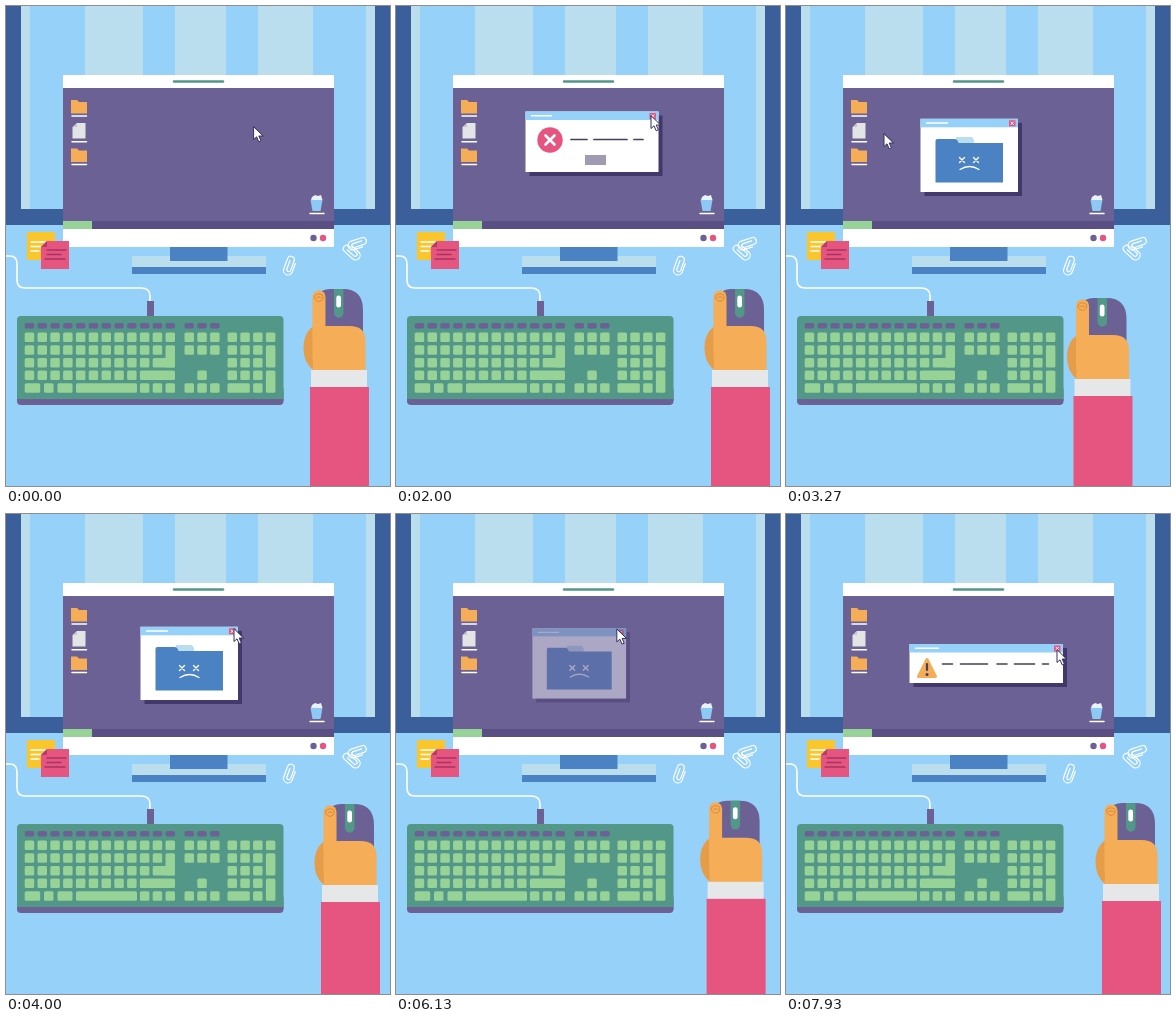
Write an HTML page that moves like this. It is 384 by 480 pixels and loops after 8000 ms.

```html
<!DOCTYPE html>
<html lang="en">
<head>
<meta charset="utf-8">
<title>Desktop errors</title>
<style>
html, body { margin: 0; width: 100%; height: 100%; overflow: hidden; background: #95d1f9; }
svg { display: block; width: 384px; height: 480px; }
</style>
</head>
<body>
<svg id="stage" viewBox="0 0 384 480" fill="none" stroke-linecap="round" stroke-linejoin="round"></svg>
<script>
const C = {
  sky: '#95d1f9', pale: '#bbdeef', navy: '#3b5f9b', blue: '#4a82c4', purple: '#6b6195',
  dark: '#594f84', shade: '#43386c', teal: '#539789', green: '#97d296', orange: '#f5ad57',
  tan: '#e69d4a', pink: '#e6557f', grey: '#e5e7e9', ink: '#43405f', white: '#fff'
};
const stage = document.getElementById('stage');

// Shape helpers; rect takes left, top, right, bottom
const rect = (x, y, x2, y2, fill, r = 0) =>
  `<rect x="${x}" y="${y}" width="${x2 - x}" height="${y2 - y}" rx="${r}" fill="${fill}"/>`;
const shape = (d, fill) => `<path d="${d}" fill="${fill}"/>`;
const line = (d, color = C.white, w = 1.5) => `<path d="${d}" stroke="${color}" stroke-width="${w}"/>`;
const dot = (x, y, r, fill) => `<circle cx="${x}" cy="${y}" r="${r}" fill="${fill}"/>`;
const group = (id, body) => `<g id="${id}">${body}</g>`;

function room() {
  const bars = [[15, 24], [79, 137], [169, 220], [252, 307], [360, 369]];
  return rect(0, 0, 384, 480, C.sky) + rect(0, 0, 384, 219, C.navy) + rect(15, 0, 369, 203, C.sky) +
    bars.map(([a, b]) => rect(a, 0, b, 203, C.pale)).join('');
}

function folder(y) {
  return shape(`M65 ${y}h6l2 2h8v11.500h-16z`, C.orange) + line(`M66 ${y + 16}h14.500`);
}

function monitor() {
  return rect(126, 250, 260, 261, C.pale) + rect(126, 261, 260, 268, C.blue) + rect(164, 240, 221.500, 255, C.blue) +
    rect(57, 69, 328, 241, C.white) + rect(57, 82, 328, 223, C.purple) +
    rect(57, 215, 328, 223, C.dark) + rect(57, 215, 86, 223, C.green) +
    line('M168 75.500h49', C.teal, 2.500) + dot(307.500, 232, 3.200, C.purple) + dot(317, 232, 3.200, C.pink) +
    folder(94) + group('mark', rect(64, 115.500, 82, 137.500, '#928bb1')) +
    shape('M71 117h8.500v15.500h-13v-11z', '#e3e4e6') + shape('M71 117v4h-4.500z', '#c6c7cd') + line('M66 135.700h14.500') +
    folder(142.500) +
    shape('M304.500 194h12l-2 11h-8z', '#8ccaf5') + shape('M305 194l1-3 3-2 3 1 3-1 1.500 5z', '#e9f2f8') +
    line('M304 207.500h14');
}

function clip(x, y, turn) {
  return `<g transform="translate(${x} ${y}) rotate(${turn})">` +
    line('M-2 -4v9a2 2 0 0 0 4 0v-10a3.500 3.500 0 0 0 -7 0v11a4.500 4.500 0 0 0 9 0v-9', C.white, 1.200) + '</g>';
}

function desk() {
  return rect(21, 226, 49, 254, '#fbc62c') + line('M25 236h19M25 240.500h15M25 245h8') +
    shape('M41 235h22v28h-28v-22z', C.pink) + shape('M41 235v6h-6z', '#b73a6b') +
    line('M41 244h19M41 248.500h14M39 253h20', '#a63363', 1.300) +
    line('M0 250h4q7 0 7 8v16q0 8 8 8h116q9 0 9 8v6', C.white, 1.600) + rect(141, 295, 148, 311, C.purple) +
    clip(284.500, 259, 20) + clip(345.500, 245, -48) + clip(352.500, 238, 72);
}

function keyboard() {
  const top = r => 326.500 + 12.700 * r;
  const key = (x, r, w = 9.500, rows = 1) =>
    rect(x, top(r), x + w, top(r) + 9.500 + 12.700 * (rows - 1), C.green, 1.500);
  const row = (x, n, r) => Array.from({ length: n }, (_, i) => key(x + 12.800 * i, r)).join('');
  const fn = (x, n) => Array.from({ length: n }, (_, i) =>
    rect(x + 12.800 * i, 317, x + 9.500 + 12.800 * i, 322.500, C.purple, 1.800)).join('');
  return rect(11, 380, 277.500, 399, C.purple, 4) + rect(11, 310, 277.500, 393, C.teal, 4) + 
    rect(11, 388, 277.500, 393, C.teal) + rect(11, 393, 277.500, 395, C.purple) +
    fn(18.700, 12) + fn(178.500, 3) +
    row(18.700, 12, 0) + row(18.700, 11, 1) + row(18.700, 10, 2) + row(18.700, 9, 3) +
    key(159.500, 1, 9.500, 2) + key(146.700, 2, 22.300) + key(133.900, 3, 35.100) +
    key(18.700, 4, 15.500) + key(38, 4) + key(51.500, 4, 15) + key(70, 4, 61) + row(133.900, 3, 4) +
    row(178.500, 3, 0) + row(178.500, 3, 1) + key(191.300, 3) + row(178.500, 3, 4) +
    row(221.500, 4, 0) + [1, 2, 3].map(r => row(221.500, 3, r)).join('') +
    key(259.900, 1, 9.500, 2) + key(259.900, 3, 9.500, 2) + key(221.500, 4, 22.300) + key(247.100, 4);
}

// Window frame with a title bar, a title stroke and a close button
function pane(id, x, y, x2, y2, title, body) {
  const bx = x2 - 9, by = y + 1.500;
  return group(id, rect(x + 4, y + 4, x2 + 4, y2 + 4, C.shade) + rect(x, y, x2, y2, C.white) +
    rect(x, y, x2, y + 8.500, C.sky) + line(`M${x + 6} ${y + 4.300}h${title}`) +
    rect(bx, by, bx + 6.500, by + 6, C.pink) +
    line(`M${bx + 2} ${by + 1.700}l2.500 2.600m0 -2.600l-2.500 2.600`, C.white, 1) + body);
}

function windows() {
  return pane('win0', 129.500, 105.500, 262.500, 166, 20,
      dot(154, 134, 12.700, C.pink) + line('M149.500 129.500l9 9m0 -9l-9 9', C.white, 2.600) +
      line('M175 133.500h16M198 133.500h33M238 133.500h9', C.ink, 1.700) + rect(189, 149, 210, 159, '#a09bb3')) +
    pane('win1', 134.500, 112.800, 232, 186, 21,
      shape('M170 137v-6h16l2 3v4h-18z', C.pale) + shape('M149.500 135q0-2 2-2h17q3 0 4 4h44.500v39.500h-67.500z', C.blue) +
      line('M173.500 151.500l5 5m0 -5l-5 5M187.500 151.500l5 5m0 -5l-5 5M174 163.500q9.500-6 19 0', C.white, 1.400)) +
    pane('win2', 123.500, 130, 277, 169, 23,
      `<path d="M141 145.500l8.500 17h-17z" fill="${C.orange}" stroke="${C.orange}" stroke-width="3"/>` +
      line('M141 150v6', C.ink, 2.200) + dot(141, 160.500, 1.500, C.ink) +
      line('M156.500 150h10M174.500 150h27M211 150h10M228.500 150h20M256.500 150h6', C.ink, 1.600));
}

function hand() {
  return group('hand',
    shape('M312 330v-40q3-7 12-7h13q20 0 20 21v27z', C.purple) +
    shape('M328 283h9.500v24a4.750 4.750 0 0 1 -9.500 0z', C.teal) + rect(330.300, 289.500, 335, 301.500, C.white, 2.300) +
    shape('M309 319q-11.500 7-11.500 23 0 14 9.500 22h9v-45z', C.tan) +
    group('finger', rect(306.500, 284.500, 319.500, 336, C.orange, 6.300) +
      line('M309 289.500q4-3.500 8 0v3.500q-4 5-8 0zM311 291.500q2-1.500 4 0', '#d98b3d', 1)) +
    shape('M306.500 326q3-2 13-6h24q16 0 16 15v30h-53q1-8 0-16z', C.orange) +
    rect(305, 364, 361, 382, C.grey) + rect(304, 381, 363, 500, C.pink));
}

const pointer = group('pointer',
  `<path d="M0 0v12.500l3-2.700 2.200 5 2.200-1-2.200-4.800h4z" fill="#fff" stroke="#34305a" stroke-width="1"/>`);

stage.innerHTML = room() + monitor() + desk() + keyboard() + windows() + pointer + hand();
const el = id => document.getElementById(id);

// Keys: time, x, y
const pointerKeys = [
  [-150, 266, 120.600], [600, 76, 125], [1000, 78, 126], [1290, 78, 126], [1800, 260, 112], [2000, 255, 110],
  [2670, 254, 110], [3200, 98, 128], [3400, 98, 128], [4000, 228, 115], [4330, 228, 115], [4670, 209, 118],
  [4800, 209, 118], [5180, 227, 115], [6020, 227, 115], [6830, 92, 123], [7000, 92, 123],
  [7520, 278, 137], [7740, 271, 136]
];
const handKeys = [
  [-150, 1.800, 0], [600, -17, 0], [1150, -17, 0], [1750, 12, 2], [2000, 11, 0], [2450, 12, 0],
  [3130, -16.500, 9], [3400, -16.500, 9], [4000, 11, 7], [4330, 10, 7], [4670, -13, 5], [4800, -13, 5],
  [5200, 8, 4], [5400, 10, 4], [5980, 9, 4], [6750, -17, 2], [7000, -17, 2], [7500, 19, 6], [7730, 12, 6]
];
const clicks = [760, 920, 2330, 4080, 4220, 5300, 5450, 5600, 7800];
const spans = [[1184, 2580], [3040, 6020], [6640, 9000]];
const fade = 200;

const clamp = v => Math.min(1, Math.max(0, v));
const ease = u => (1 - Math.cos(Math.PI * u)) / 2;

function at(keys, t) {
  const i = keys.findIndex(k => k[0] > t);
  if (i < 0) return keys[keys.length - 1].slice(1);
  const a = keys[i - 1], b = keys[i], s = ease((t - a[0]) / (b[0] - a[0]));
  return [1, 2].map(n => a[n] + (b[n] - a[n]) * s);
}

const move = (id, [x, y]) => el(id).setAttribute('transform', `translate(${x.toFixed(2)} ${y.toFixed(2)})`);
const centers = [[196, 135.750], [183.250, 149.400], [200.250, 149.500]];

function draw(t) {
  move('pointer', at(pointerKeys, t));
  move('hand', at(handKeys, t));
  const press = clicks.reduce((sum, c) => sum + Math.sin(Math.PI * clamp((t - c) / 130)), 0);
  move('finger', [0, 2.500 * press]);
  el('mark').style.opacity = t > 700 && t < 1420 ? 1 : 0;
  spans.forEach(([open, close], i) => {
    const k = Math.min(clamp((t - open) / fade), 1 - clamp((t - close) / fade));
    const [x, y] = centers[i], win = el('win' + i);
    win.style.opacity = k;
    win.setAttribute('transform', `translate(${x} ${y}) scale(${0.93 + 0.07 * k}) translate(${-x} ${-y})`);
  });
}

const start = performance.now();
function tick() {
  draw((performance.now() - start) % 8000);
  requestAnimationFrame(tick);
}
tick();
</script>
</body>
</html>
```
